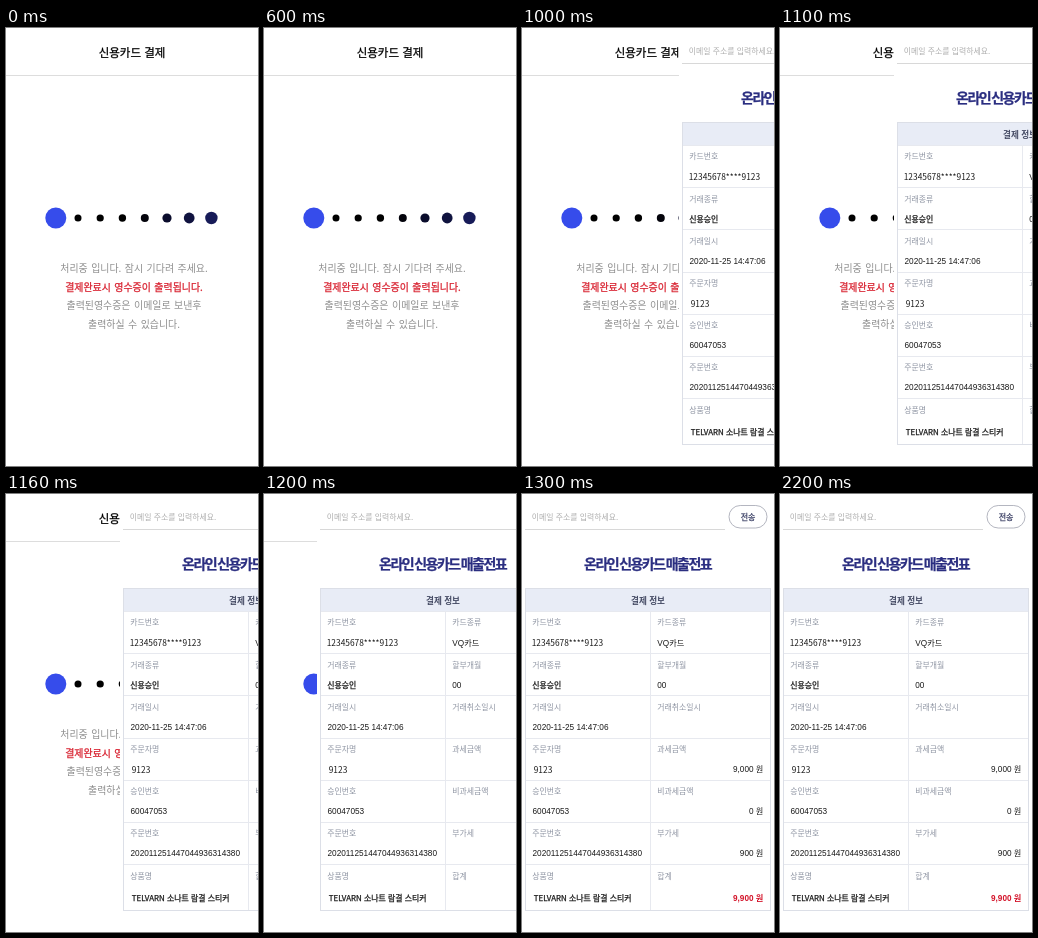
Animation of 252x438 px, one loop 2800 ms. Source, as an HTML page:

```html
<!DOCTYPE html>
<html lang="ko">
<head>
<meta charset="utf-8">
<style>
html, body { margin: 0; width: 100%; height: 100%; overflow: hidden; background: #fff; }
svg { display: block; width: 100%; height: 100%; }
text { font-family: "Noto Sans CJK KR", "Noto Sans CJK", sans-serif; white-space: pre; fill: currentColor; }
.medium { stroke: currentColor; stroke-width: .25px; }
.label { font-size: 7.9px; color: #8f95a3; }
.value { font-size: 8.2px; color: #1a1a1a; }
.num { font-family: "Liberation Sans", Arial, "Noto Sans CJK KR", sans-serif; }
.total { color: #d4162c; font-weight: 700; }
.grid { fill: none; stroke: #e7e9ef; }
</style>
</head>
<body>
<svg viewBox="0 0 252 438">
  <text class="medium" x="126" y="28.6" font-size="11.5" text-anchor="middle">신용카드 결제</text>
  <path d="M0 47.5H252" stroke="#ddd"/>
  <g id="dots"></g>
  <g font-size="9.95" color="#8e8e8e" text-anchor="middle" word-spacing=".7">
    <text x="128" y="244">처리중 입니다. 잠시 기다려 주세요.</text>
    <text class="medium" x="128" y="262.5" color="#d8202f">결제완료시 영수증이 출력됩니다.</text>
    <text x="128" y="281">출력된영수증은 이메일로 보낸후</text>
    <text x="128" y="299.7">출력하실 수 있습니다.</text>
  </g>
  <g id="panel">
    <rect width="252" height="438" fill="#fff"/>
    <text x="9.7" y="26" font-size="7.9" color="#adadad">이메일 주소를 입력하세요.</text>
    <path d="M3 35.5H203" stroke="#d8d8d8"/>
    <rect x="207" y="11.5" width="38" height="22.5" rx="11.2" fill="#fff" stroke="#b4b6c0"/>
    <text class="medium" x="226" y="25.8" font-size="8" color="#3c4166" text-anchor="middle">전송</text>
    <text class="medium" x="62" y="75.3" font-size="14" font-weight="700" color="#2b2e80" letter-spacing="-1.5" word-spacing="-1.4">온라인 신용카드 매출전표</text>
    <rect x="3" y="95" width="246" height="23" fill="#e8ecf6"/>
    <text x="126" y="109.7" font-size="8.6" font-weight="700" color="#474d66" text-anchor="middle">결제 정보</text>
    <path class="grid" d="M128.5 118V417"/>
    <g id="rows"></g>
    <rect class="grid" x="3.5" y="94.5" width="245" height="322" style="stroke:#dcdfe7"/>
  </g>
</svg>
<script>
const NS = 'http://www.w3.org/2000/svg';
const $ = id => document.getElementById(id);

function add(parent, tag, attrs, text = '') {
  const el = document.createElementNS(NS, tag);
  for (const key in attrs) el.setAttribute(key, attrs[key]);
  el.textContent = text;
  parent.append(el);
}

// x, radius, colour
[[49.8, 10.5, '#364ceb'], [72, 3.5, '#000'], [94.2, 3.6, '#000'], [116.4, 3.7, '#000'],
 [138.8, 4, '#04040c'], [161, 4.6, '#0a0c2c'], [183.2, 5.4, '#10133f'], [205.4, 6.2, '#171b58']]
  .forEach(([cx, r, fill]) => add($('dots'), 'circle', { cx, cy: 190, r, fill }));

// left label, value, class, x and baseline; right label, value and baseline
const rows = [
  ['카드번호', '12345678****9123', '', 9.7, 152.3, '카드종류', 'VQ카드', 151.8],
  ['거래종류', '신용승인', 'medium', 10.3, 193.7, '할부개월', '00', 194],
  ['거래일시', '2020-11-25 14:47:06', 'num', 10.5, 236, '거래취소일시', '', 236],
  ['주문자명', '9123', '', 11.7, 279.2, '과세금액', '9,000 원', 277.8],
  ['승인번호', '60047053', 'num', 10.5, 320, '비과세금액', '0 원', 320],
  ['주문번호', '202011251447044936314380', 'num', 10.5, 362.3, '부가세', '900 원', 362.3],
  ['상품명', 'TELVARN 소나트 람결 스티커', 'medium', 11.8, 407.2, '합계', '9,900 원', 407.2]
];
rows.forEach(([label, value, kind, x, y, label2, value2, y2], i) => {
  const g = $('rows'), top = 118 + i * 42.2, price = i > 2;
  const size = kind == 'medium' ? 7.9 : kind ? 8.25 : 8.4;
  add(g, 'path', { class: 'grid', d: `M3 ${Math.round(top) - .5}H249` });
  add(g, 'text', { class: 'label', x: 10.2, y: top + 13.4 }, label);
  add(g, 'text', { class: 'label', x: 135.2, y: top + 13.4 }, label2);
  add(g, 'text', { class: 'value ' + kind, x, y, style: `font-size:${size}px` }, value);
  add(g, 'text', {
    class: 'value num' + (i == 6 ? ' total' : ''), x: price ? 241.3 : 135.3, y: y2,
    'text-anchor': price ? 'end' : 'start'
  }, value2);
});

// The panel slides in from the right in 100 ms steps.
const stops = [252, 157, 114, 53, 0];
function frame(now) {
  const t = now % 2800;
  const step = t < 1000 ? 0 : Math.min(4, Math.floor((t - 900) / 100));
  $('panel').setAttribute('transform', `translate(${stops[step]} 0)`);
  requestAnimationFrame(frame);
}
frame(0);
</script>
</body>
</html>
```
